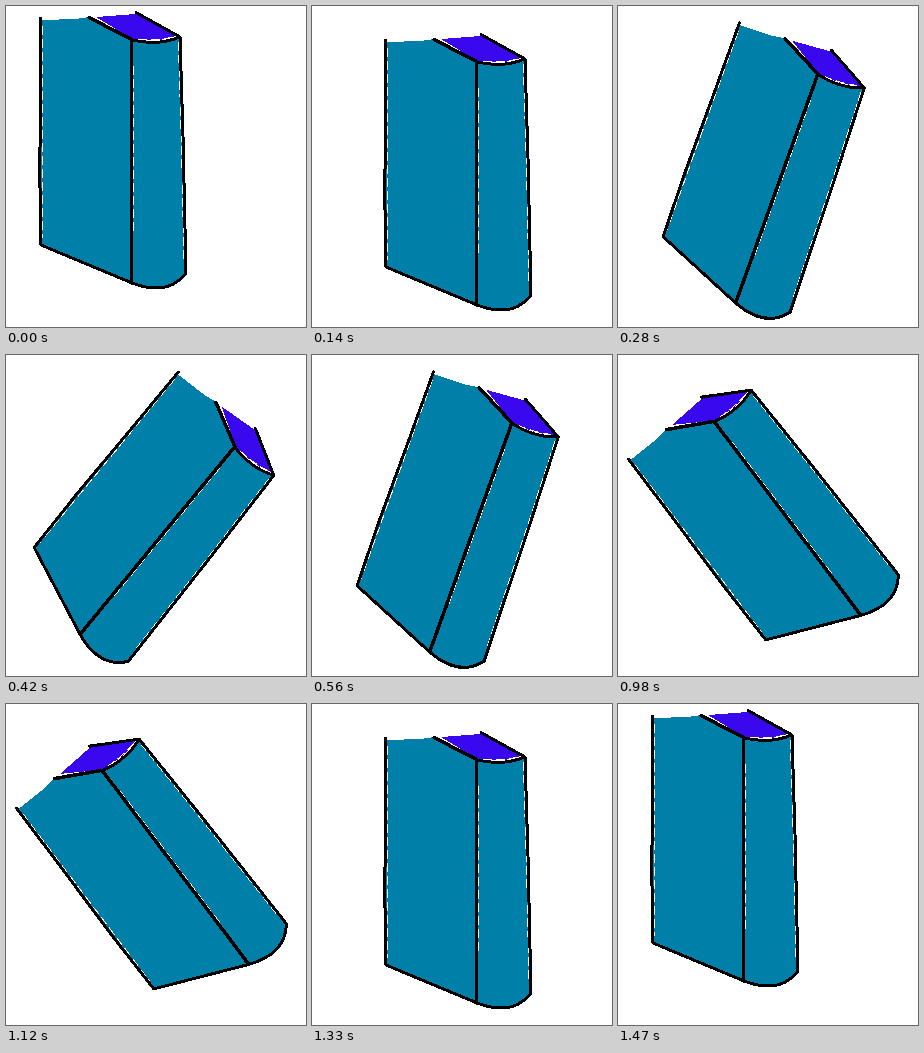
Animation of 300 by 321 pixels, one loop 1.54 s. Source, as an HTML page:

```html
<!DOCTYPE html>
<html lang="en">
<head>
<meta charset="utf-8">
<title>Rocking book</title>
<style>
  html, body { margin: 0; width: 100%; height: 100%; overflow: hidden; background: #fff; }
  svg { display: block; width: 100%; height: 100%; shape-rendering: crispEdges; }
  .ink { fill: none; stroke: #000; stroke-width: 3; stroke-linecap: round; stroke-linejoin: round; }
  .bold { stroke-width: 3.6; }
  .gap { fill: none; stroke: #fff; stroke-dasharray: 9 4; }
</style>
</head>
<body>
<svg viewBox="0 0 300 321">
  <g id="book">
    <path fill="#0080a8" d="M35 14 L70 13 L83 11 L126 34 Q152 40 174 31 L177 130 L180 267 C167 284 147 285 126 277 L35 239 Z"/>
    <path fill="#3a08ee" d="M90 11 L130 8 L170 30 Q152 37 126 33 Z"/>
    <path class="gap" d="M127.6 60 V225 M172.4 36 L175.2 130 L178 255 M36.3 20 V232 M132 33.5 Q152 35 171 30"/>
    <path class="ink" d="M34.6 12 L34.4 90 L33.8 170 L35 239 L126 277 C147 285 167 284 180 267 L177 130 L174 31 Q152 40 126 34
      M130 6.5 L174 31"/>
    <path class="ink bold" d="M83 11.5 L125.6 33.5 V277"/>
  </g>
</svg>
<script>
const STEP = 70, STEPS = 22;
const book = document.getElementById('book');

// Triangular swing: 0 to 1 and back over eight steps, highest at `peak`.
const swing = (step, peak) => Math.max(0, 1 - Math.abs(step - peak) / 4);

function draw(now) {
  const step = Math.floor(now / STEP) % STEPS;
  const tilt = 39.5 * swing(step, 6) - 49.5 * swing(step, 15);
  const slide = Math.min(1, step / 2, (STEPS - 1 - step) / 2);
  book.setAttribute('transform',
    `translate(${39 * slide} ${22 * slide}) rotate(${tilt} 107.5 141)`);
}

const start = performance.now();
function tick() {
  draw(performance.now() - start);
  requestAnimationFrame(tick);
}
tick();
</script>
</body>
</html>
```
